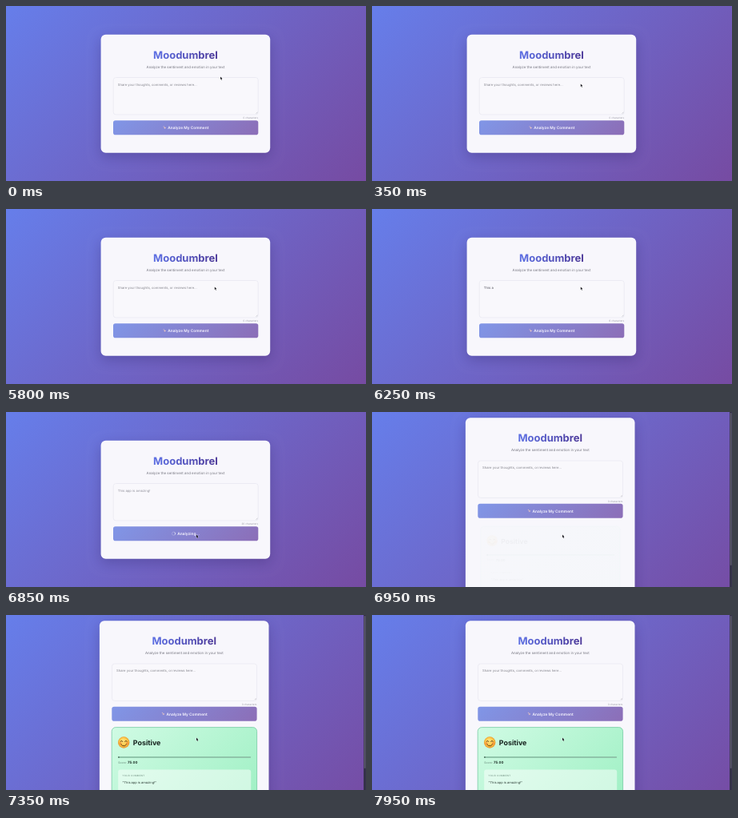
Recreate the animation shown at these times as an HTML page with a canvas. Size 450x219 px, loop 8000 ms.

```html
<!DOCTYPE html>
<html lang="en">
<head>
<meta charset="utf-8">
<title>Moodumbrel</title>
<style>
html, body { margin: 0; width: 100%; height: 100%; overflow: hidden; background: #6e65c6; }
canvas { display: block; width: 100%; height: 100%; }
</style>
</head>
<body>
<canvas id="stage"></canvas>
<script>
const W = 450, H = 219, LOOP = 8000, STEP = 50;
const TYPED = 'This app is amazing!';
const canvas = document.getElementById('stage');
const ctx = canvas.getContext('2d');
const dpr = window.devicePixelRatio || 1;
canvas.width = W * dpr;
canvas.height = H * dpr;

const clamp = x => Math.max(0, Math.min(1, x));
const span = (t, a, b) => clamp((t - a) / (b - a));
const smooth = x => x * x * (3 - 2 * x);
const easeOut = x => 1 - (1 - x) ** 2;
const mix = (a, b, p) => a + (b - a) * p;

// Same geometry as a CSS linear-gradient at 135deg
function diagonal(x, y, w, h, from, to) {
  const cx = x + w / 2, cy = y + h / 2, d = (w + h) / 4;
  const g = ctx.createLinearGradient(cx - d, cy - d, cx + d, cy + d);
  g.addColorStop(0, from);
  g.addColorStop(1, to);
  return g;
}

function box(x, y, w, h, r, fill, stroke, line = 0.6) {
  ctx.beginPath();
  ctx.roundRect(x, y, w, h, r);
  if (fill) { ctx.fillStyle = fill; ctx.fill(); }
  if (stroke) { ctx.strokeStyle = stroke; ctx.lineWidth = line; ctx.stroke(); }
}

function text(str, x, y, size, color, weight = 400, align = 'left', spacing = 0) {
  ctx.font = `${weight} ${size}px Inter, sans-serif`;
  ctx.textAlign = align;
  ctx.letterSpacing = spacing + 'px';
  ctx.fillStyle = color;
  ctx.fillText(str, x, y);
}

function line(points, color, width) {
  ctx.beginPath();
  points.forEach(([x, y], i) => i ? ctx.lineTo(x, y) : ctx.moveTo(x, y));
  ctx.strokeStyle = color;
  ctx.lineWidth = width;
  ctx.stroke();
}

function disc(x, y, r, fill) {
  ctx.beginPath();
  ctx.arc(x, y, r, 0, 2 * Math.PI);
  ctx.fillStyle = fill;
  ctx.fill();
}

function background(scrolls) {
  const w = scrolls ? 447 : W, h = scrolls ? 250 : H;
  ctx.fillStyle = diagonal(0, 0, w, h, '#667eea', '#764ba2');
  ctx.fillRect(0, 0, w, h);
  if (scrolls) {
    ctx.fillStyle = '#35324a';
    ctx.fillRect(447, 0, 3, H);
    box(447.7, 1, 1.7, 191, 0.8, '#625f72');
  }
}

function sparkle(x, y, r, color) {
  ctx.beginPath();
  ctx.moveTo(x, y - r);
  for (let i = 1; i <= 4; i++) {
    const a = i * Math.PI / 2 - Math.PI / 2;
    ctx.quadraticCurveTo(x, y, x + r * Math.cos(a), y + r * Math.sin(a));
  }
  ctx.fillStyle = color;
  ctx.fill();
}

function button(t, busy) {
  box(134, 143.2, 181.3, 18, 2.8, diagonal(134, 143, 181, 18, '#8096e7', '#8c6eb7'));
  if (!busy) {
    sparkle(198.6, 152.4, 1.7, '#e9c6c4');
    sparkle(197.1, 150.9, 0.8, '#e9c6c4');
    text('Analyze My Comment', 202.3, 154.1, 4.8, '#f8f6ff', 600);
    return;
  }
  const a = t / 1000 * 2 * Math.PI;
  ctx.lineWidth = 0.6;
  ctx.strokeStyle = 'rgba(255,255,255,.35)';
  ctx.beginPath();
  ctx.arc(209.5, 152.2, 2.1, 0, 2 * Math.PI);
  ctx.stroke();
  ctx.strokeStyle = '#fff';
  ctx.beginPath();
  ctx.arc(209.5, 152.2, 2.1, a, a + Math.PI / 2);
  ctx.stroke();
  text('Analyzing...', 214.2, 154.1, 4.8, '#f8f6ff', 600);
}

function card(t, height, typed, busy) {
  ctx.save();
  ctx.shadowColor = 'rgba(30,20,80,.25)';
  ctx.shadowBlur = 16 * dpr;
  ctx.shadowOffsetY = 5 * dpr;
  box(118.6, 35.8, 211.6, height, 6, '#f8f7fc');
  ctx.restore();

  const ink = ctx.createLinearGradient(184, 57, 265, 66);
  ink.addColorStop(0, '#5d70e4');
  ink.addColorStop(1, '#4c3898');
  text('Moodumbrel', 224.4, 65.8, 13, ink, 700, 'center');
  text('Analyze the sentiment and emotion in your text', 224.5, 77.5, 4.42, '#74747f', 400, 'center');

  box(134.2, 89.5, 181, 46.4, 3.2, '#f9f8fc', '#e5e4ee');
  line([[312.4, 134.6], [314.4, 132.6]], '#a5a5ad', 0.4);
  line([[313.6, 134.7], [314.5, 133.8]], '#a5a5ad', 0.4);
  if (typed) text(TYPED.slice(0, typed), 139.8, 100, 4.22, busy ? '#92929c' : '#55555f');
  else text('Share your thoughts, comments, or reviews here...', 139.8, 99.6, 4.18, '#85858d');
  text(typed + ' characters', 315.2, 141.3, 3.18, '#a0a0aa', 400, 'right');
  button(t, busy);
}

function smiley(x, y) {
  const g = ctx.createRadialGradient(x - 1, y - 2.5, 1, x, y, 7.3);
  g.addColorStop(0, '#ffe37a');
  g.addColorStop(0.65, '#fbc644');
  g.addColorStop(1, '#e8952f');
  disc(x, y, 7.2, g);
  disc(x - 4.2, y + 1.3, 1.7, 'rgba(240,110,60,.45)');
  disc(x + 4.2, y + 1.3, 1.7, 'rgba(240,110,60,.45)');
  ctx.lineCap = 'round';
  ctx.strokeStyle = '#5f3512';
  ctx.lineWidth = 0.9;
  for (const dx of [-2.7, 2.7]) {
    ctx.beginPath();
    ctx.arc(x + dx, y - 0.6, 1.4, Math.PI * 1.1, Math.PI * 1.9);
    ctx.stroke();
  }
  ctx.beginPath();
  ctx.arc(x, y + 0.8, 3.6, Math.PI * 0.13, Math.PI * 0.87);
  ctx.stroke();
  ctx.lineCap = 'butt';
}

function result(p) {
  const s = mix(0.96, 1, p);
  ctx.save();
  ctx.globalAlpha = p;
  ctx.translate(223, 200);
  ctx.scale(s, s);
  ctx.translate(-223, -200);
  box(132.2, 140.6, 181.4, 95, 5, diagonal(132, 140, 182, 95, '#d0fbe4', '#9ff0c4'), '#6cc79d', 0.7);
  smiley(147.2, 159.5);
  text('Positive', 158.8, 163.4, 8.9, '#17231f', 700);
  box(140.2, 177.1, 166, 1.9, 0.9, '#90c5aa');
  box(140.2, 177.1, 1.4, 1.9, 0.7, '#41614f');
  text('Score:', 140.2, 185.9, 3.5, '#688a7a');
  text('75.00', 152, 186, 4.4, '#1d2f27', 700);
  box(140.2, 193.4, 166, 34, 3, 'rgba(255,255,255,.5)');
  text('YOUR COMMENT', 145.6, 202.3, 2.9, '#6b8a7c', 400, 'left', 0.3);
  text(`"${TYPED}"`, 145.6, 211.3, 4, '#2c3d36');
  ctx.restore();
}

function pointer(t) {
  const a = easeOut(span(t, 0, 350));
  const b = smooth(span(t, 6450, 6650));
  const x = mix(mix(268, 260.8, a), 238, b);
  const y = mix(mix(88.4, 97.4, a), 153.6, b);
  ctx.save();
  ctx.translate(x, y);
  ctx.beginPath();
  [[0, 0], [0, 3.6], [0.8, 2.9], [1.4, 4.3], [2, 4], [1.4, 2.7], [2.5, 2.6]]
    .forEach(([px, py]) => ctx.lineTo(px, py));
  ctx.closePath();
  ctx.strokeStyle = 'rgba(255,255,255,.8)';
  ctx.lineWidth = 0.6;
  ctx.stroke();
  ctx.fillStyle = '#16161c';
  ctx.fill();
  ctx.restore();
}

function draw(now) {
  const t = Math.floor(now % LOOP / STEP) * STEP;
  const done = t >= 6950;
  const busy = t >= 6800 && !done;
  const typed = done ? 0 : Math.round(TYPED.length * span(t, 6150, 6500));

  ctx.setTransform(dpr, 0, 0, dpr, 0, 0);
  ctx.textRendering = 'geometricPrecision';
  background(done);
  ctx.save();
  if (done) ctx.translate(-1.7, -28.5);
  card(t, done ? 230 : 148, typed, busy);
  ctx.restore();
  if (done) result(smooth(span(t, 6930, 7110)));
  pointer(t);
}

let start;
function tick(now) {
  start ??= now;
  draw(now - start);
  requestAnimationFrame(tick);
}
draw(0);
requestAnimationFrame(tick);
</script>
</body>
</html>
```
